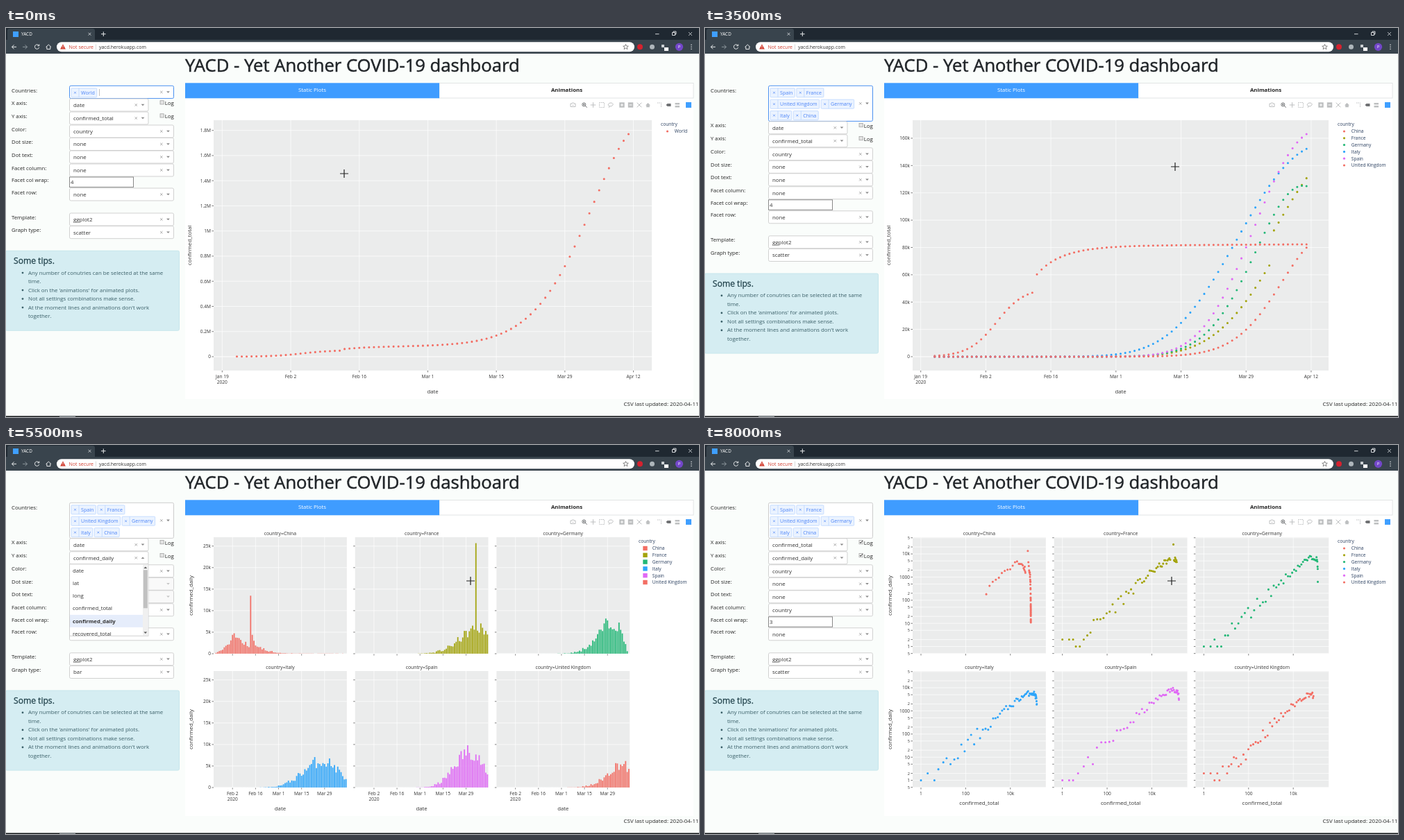
An HTML page for the animation above (8500 ms loop, 998 by 561 pixels).

```html
<!DOCTYPE html>
<html lang="en">
<head>
<meta charset="utf-8">
<title>YACD</title>
<style>
html, body { margin: 0; width: 100%; height: 100%; overflow: hidden; background: #fafdfb; }
svg { display: block; width: 998px; height: 561px; font-family: 'Open Sans', 'Noto Sans', sans-serif; }
text { white-space: pre; }
</style>
</head>
<body>
<svg id="stage" viewBox="0 0 998 561"></svg>
<script>
const STEP = 500, STEPS = 17;
const PALETTE = ['#f36e64', '#a3a30a', '#22b776', '#2ea5fa', '#e069f5'];
const ORDER = ['World', 'Spain', 'France', 'United Kingdom', 'Germany', 'Italy', 'China'];
const FIELDS = ['date', 'lat', 'long', 'confirmed_total', 'confirmed_daily', 'recovered_total',
  'recovered_daily', 'deaths_total', 'deaths_daily'];
const days = [...Array(81).keys()];

let seed = 11;
const rnd = () => (seed = seed * 16807 % 2147483647) / 2147483647;

// smooth growth: a cubic in log space through the values at four days
function growth(...values) {
  const knots = [39, 53, 67, 80];
  return d => Math.exp(knots.reduce((sum, a, i) =>
    sum + Math.log(values[i]) * knots.reduce((p, b, j) => i == j ? p : p * (d - b) / (a - b), 1), 0));
}

const china = d => 50000 / (1 + Math.exp((13.3 - d) / 3)) + 20 * d +
  (d < 22 ? 0 : 12500 + 18200 * (1 - Math.exp((22 - d) / 6)));
const france = growth(130, 4513, 40708, 110700);
const others = growth(8437, 86444, 637998, 1688500);
const CASES = {
  World: d => china(d) + others(d),
  Spain: growth(84, 7798, 80110, 163027),
  France: d => france(d) + (d < 73 ? 0 : 20000),
  'United Kingdom': growth(36, 1145, 19780, 79874),
  Germany: growth(130, 5795, 62095, 124908),
  Italy: growth(1694, 24747, 97689, 152271),
  China: china
};
const FATAL = { Germany: .022, China: .04, Spain: .102, France: .106, 'United Kingdom': .124, Italy: .128 };

const data = {};
for (const name of ORDER) {
  const sum = days.map(d => Math.round(CASES[name](d)));
  const daily = sum.map((v, d) => {
    const diff = d ? v - sum[d - 1] : 0;
    if (diff > 9000) return diff;
    const noise = .45 + 1.2 / (1 + diff / 300);
    return Math.max(0, Math.round(diff * Math.exp(noise * (rnd() - .5))));
  });
  const deaths = sum.map((v, d) => FATAL[name] * v * (d / 80) ** 2);
  data[name] = { date: days, confirmed_total: sum, confirmed_daily: daily, deaths_total: deaths };
}

const text = (x, y, s, size = 7.85, fill = '#333', anchor = 'start', extra = '') =>
  `<text x="${x}" y="${y + size * .36}" font-size="${size}" fill="${fill}" text-anchor="${anchor}" ${extra}>${s}</text>`;
const rect = (x, y, w, h, fill, extra = '') =>
  `<rect x="${x}" y="${y}" width="${w}" height="${h}" fill="${fill}" ${extra}/>`;
const line = (d, stroke, w = 1, extra = '') =>
  `<path d="${d}" fill="none" stroke="${stroke}" stroke-width="${w}" ${extra}/>`;
const shape = (d, fill) => `<path d="${d}" fill="${fill}"/>`;
const disc = (x, y, r, fill) => `<circle cx="${x}" cy="${y}" r="${r}" fill="${fill}"/>`;
const cross = (x, y, r, c, w = .8) => line(`M${x - r} ${y - r}l${2 * r} ${2 * r}m0 ${-2 * r}l${-2 * r} ${2 * r}`, c, w);
const plus = (x, y, r, c, w = 1) => line(`M${x - r} ${y}h${2 * r}m${-r} ${-r}v${2 * r}`, c, w);
const arrow = (x, y, up, c = '#888') => shape(`M${x - 2.4} ${y + (up ? 1.3 : -1.3)}h4.8l-2.4 ${up ? -2.6 : 2.6}z`, c);
const bold = 'font-weight="700"';
const heavy = (c, w) => `stroke="${c}" stroke-width="${w}"`;

const ruler = document.createElement('canvas').getContext('2d');
ruler.font = "7.1px 'Open Sans', 'Noto Sans', sans-serif";
const chipWidth = n => 17 + ruler.measureText(n).width;

function browser(hover) {
  const w = '#e8eaec';
  return rect(0, 0, 998, 18, '#1f2831') + rect(0, 17, 998, 20, '#39444d') +
    shape('M2 18V4q0-3 3-3H125q3 0 3 3V18z', '#39444d') +
    rect(10, 5, 8, 8, '#3f9fff') + text(22, 8.5, 'YACD', 6.4, '#fff') +
    cross(120.5, 8.7, 1.9, w) + plus(140.3, 8.7, 3.3, w) +
    line('M935 8.7h5.5M959.5 6.5h4v4h-4zM961 6.5V5h4v4h-1.5', w, .9) + cross(985.5, 8.5, 2.4, w) +
    line('M15 27.3H8.5m3-3l-3 3 3 3', w) + line('M24 27.3h6.5m-3-3l3 3-3 3', '#8d969d') +
    line('M47.3 25.3a3.2 3.2 0 1 0 .4 2.8M47.8 23.5v2.3h-2.3M57.5 27.5l3.8-3.5 3.8 3.5M58.8 27v3.5h5V27', w) +
    rect(73, 20.3, 832, 14, hover ? '#eceff1' : '#fff', 'rx="7"') +
    shape('M82 23.2l3.9 7.2h-7.8z', '#d23f31') + line('M82 25.5v2.2m0 .8v.8', '#fff', .8) +
    text(90.5, 27.3, 'Not secure', 7.05, '#d23f31') + line('M129.5 23.5V31', '#ccc', .7) +
    text(134, 27.3, 'yacd.herokuapp.com', 6.95) +
    line('M892.5 23.5l1.1 2.5 2.7.2-2.1 1.7.7 2.7-2.4-1.5-2.4 1.5.7-2.7-2.1-1.7 2.7-.2z', '#555', .7) +
    disc(913, 27.3, 4, '#d5222f') + disc(930.5, 27.3, 3.5, '#aeb6bb') +
    rect(944, 24, 4, 4, '#c9ced1') + rect(948, 28, 6, 5, '#fff') +
    disc(969.5, 27.3, 5.6, '#7347c9') + text(969.5, 27.3, 'P', 6, '#fff', 'middle') +
    [24.3, 27.3, 30.3].map(y => disc(987, y, .8, w)).join('');
}

function modebar(short) {
  const light = '#bdbfc0', dark = '#6f7173', s = short ? 25 : 0;
  const icon = (x, d, c = light) => line(d, c, 1, `transform="translate(${x} 111)"`);
  const tile = x => rect(x - 3.7, 107.3, 7.4, 7.4, light);
  return icon(816.5 + s, 'M-3.5-2h2l.5-1h2l.5 1h2v4.5h-7zM-1 .3h2') +
    icon(833 + s, 'M1.8-.6a2.5 2.5 0 1 0-5 0 2.5 2.5 0 1 0 5 0M1.2 1.2l2.5 2.5M-2-.6h2.6M-.7-1.9v2.6', dark) +
    plus(845.5 + s, 111, 3.8, light) +
    (short ? '' : rect(854.5, 107.5, 7, 7, 'none', `stroke="${light}" stroke-dasharray="1.5 1"`) +
      icon(870.5, 'M-2 1.5c-3-2 0-4.5 2.5-4.5s4.5 2 2 4-4 0-4.5.5 1 1.5-.5 2.5')) +
    tile(887) + plus(887, 111, 2, '#fff') + tile(899.5) + line('M897.5 111h4', '#fff') +
    cross(912, 111, 3.3, light, 1) + shape('M921 111.5l3.5-3.5 3.5 3.5h-1.2v2.7h-4.6v-2.7z', light) +
    line('M938 108h5.500v6', light, 1, 'stroke-dasharray="1.5 1"') + shape('M950.5 111l2-2h5v4h-5z', dark) +
    rect(963.5, 108, 6.5, 2.5, light) + rect(963.5, 112, 6.5, 2.5, light) + rect(979, 107, 8, 8, '#3f9fff');
}

function select(y, value, { right = 241.5, off = false, open = false } = {}) {
  const a = right - 8;
  return rect(91.5, y - 9, right - 91.5, 18, off ? '#f9f9f9' : '#fff', 'rx="2" stroke="#ccc" stroke-width=".9"') +
    text(97, y, value) + (off ? '' : cross(a - 9.7, y, 1.7, '#999')) + arrow(a, y, open, off ? '#c4c4c4' : '#888');
}

function menu(y, h, right, items, chosen) {
  return rect(91.5, y, right - 91.5, h, '#fff', 'stroke="#ccc" stroke-width=".9"') +
    items.map((s, i) => {
      const on = s == chosen, top = y + .3 + i * 18.2;
      return (on ? rect(92, top, right - 92.5, 18, '#e6edfb') : '') +
        text(96, top + 9, s, 7.75, '#333', 'start', on ? bold : '');
    }).join('');
}

function chips(names, focus, caret) {
  const blue = '#4a83f7', pale = '#bcd6ff';
  let x = 94, row = 0, s = '';
  for (const n of names) {
    const w = chipWidth(n);
    if (x + w > 218) { x = 94; row++; }
    const y = 86.8 + row * 16.4;
    s += rect(x, y, w, 13, '#ebf3ff', `rx="1" stroke="${pale}" stroke-width=".8"`) +
      line(`M${x + 11} ${y}v13`, pale, .8) + cross(x + 5.5, y + 6.5, 1.4, blue, .7) + text(x + 14, y + 6.6, n, 7.1, blue);
    x += w + 2.5;
  }
  if (x > 215) row++;
  const h = 18.3 + row * 16.4, mid = 83.3 + h / 2;
  const box = rect(91.5, 83.3, 150, h, '#fff', `rx="2" stroke="${focus ? '#4a90f0' : '#ccc'}"`) +
    cross(223.8, mid, 1.7, '#999') + arrow(233.5, mid);
  return { svg: box + s + (caret ? line('M134.5 88v10', '#999', .6) : ''), shift: row * 16.4 };
}

const TIPS = ['*Any number of conutries can be selected at the same', 'time.', "*Click on the 'animations' for animated plots.",
  '*Not all settings combinations make sense.', "*At the moment lines and animations don't work", 'together.'];

function tips(t) {
  const ink = '#3a5f68', dark = '#24454e';
  return rect(-.5, t, 250, 115, '#d5edf2', 'rx="2" stroke="#c6e6ec"') +
    text(11, t + 14.7, 'Some tips.', 12.1, dark, 'start', heavy(dark, .3)) +
    TIPS.map((r, i) => {
      const y = t + 31.5 + i * 12.5;
      return (r[0] == '*' ? disc(24, y + .3, 1.4, ink) : '') + text(32, y, r.replace('*', ''), 7.85, ink);
    }).join('');
}

function logBox(y, on) {
  return rect(222, y - 3.2, 5.2, 5.2, on ? '#fff' : '#e4e4e4', 'stroke="#999" stroke-width=".7"') +
    text(228.7, y, 'Log', 7.85, '#222') + (on ? line(`M223 ${y - .8}l1.3 1.5 2.4-3.3`, '#222') : '');
}

function form(v) {
  const c = chips(v.names, v.step < 8, v.step == 0), o = c.shift;
  const wrap = y => rect(91.5, y - 7.5, 92, 14.5, '#fff', 'stroke="#888"') + text(93, y, v.facet ? '3' : '4', 7.75);
  const rows = [
    ['X axis:', 111, y => select(y, v.x, { right: 205 }) + logBox(y - 3, v.log)],
    ['Y axis:', 130, y => select(y, v.y, { right: 205, open: v.menu == 'y' }) + logBox(y - 3, v.log)],
    ['Color:', 149, y => select(y, 'country')],
    ['Dot size:', 167.5, y => select(y, 'none', { off: v.kind != 'scatter' })],
    ['Dot text:', 186, y => select(y, 'none', { off: v.kind == 'bar' })],
    ['Facet column:', 205, y => select(y, v.facet ? 'country' : 'none')],
    ['Facet col wrap:', 222.5, wrap],
    ['Facet row:', 240, y => select(y, 'none')],
    ['Template:', 276, y => select(y, 'ggplot2')],
    ['Graph type:', 294.7, y => select(y, v.kind, { open: v.menu == 'kind' })]
  ];
  let s = c.svg + text(8, 90, 'Countries:', 7.75, '#222') + tips(321.3 + o);
  for (const [label, y, draw] of rows) s += text(8, y + o - 3.2, label, 7.75, '#222') + draw(y + o);
  if (v.menu == 'kind') s += menu(303.7 + o, 54.5, 241.5, ['scatter', 'bar', 'line'], v.kind);
  if (v.menu == 'y') {
    const from = v.y == 'deaths_total' ? 3 : 0;
    s += menu(139 + o, 103.5, 205, FIELDS.slice(from, from + 6), v.y) + rect(197, 139.5 + o, 7.5, 102.5, '#f0f0f0') +
      rect(197.8, (from ? 168 : 147.5) + o, 6, 55, '#c1c1c1') +
      arrow(200.8, 144 + o, true, '#555') + arrow(200.8, 238 + o, false, '#555');
  }
  return s;
}

const range = (from, to, step) => {
  const r = [];
  for (let v = from; v <= to + 1e-9; v += step) r.push(v);
  return r;
};
const short = (n, mega) => n && mega ? +(n / 1e6).toFixed(1) + 'M' : n > 1000 ? n / 1000 + 'k' : String(n);
const dayName = d => new Date(Date.UTC(2020, 0, 22 + d)).toLocaleDateString('en-US', { month: 'short', day: 'numeric', timeZone: 'UTC' });
const lg = Math.log10;

function chart(v) {
  const { kind, facet, log } = v;
  const byDate = v.x == 'date';
  const names = [...v.names].sort();
  const right = v.step < 2 ? 930 : v.step == 2 ? 927.4 : 898;
  const color = n => PALETTE[names.indexOf(n) % 5];
  const stacked = kind == 'bar' && !facet;
  const top = f => Math.max(...names.map(n => Math.max(...data[n][f])));
  const yMax = stacked ? names.reduce((a, n) => a + data[n][v.y][80], 0) : top(v.y);
  const xMax = top('confirmed_total');
  const boxes = facet ? names.map((n, i) => {
    const l = 299 + (i % 3) * 203.7, t = i < 3 ? 133 : 326;
    return { l, w: 191.8, t, h: 168, names: [n], low: i > 2, first: i % 3 == 0 };
  }) : [{ l: 299, w: right - 299, t: 133, h: 361, names, low: true, first: true }];
  const yStep = yMax > 1e6 ? 2e5 : yMax > 3e5 ? 1e5 : yMax > 5e4 ? 2e4 : 5e3;
  const [from, to] = { scatter: [-4.75, 84.75], line: [0, 80], bar: [-.5, 80.5] }[kind];
  let s = rect(258, 102, 732, 433, '#fff') + modebar(kind == 'line');

  for (const { l, w, t, h, names: shown, low, first } of boxes) {
    const b = t + h, mid = l + w / 2;
    const pad = kind == 'bar' ? 0 : kind == 'line' ? h * .05 : facet ? 10.4 : 20;
    const tall = kind == 'bar' ? h * .95 : h - 2 * pad;
    const part = (n, max) => log ? lg(n) / lg(max) : n / max;
    const Y = n => b - pad - tall * part(n, yMax);
    const X = n => byDate ? l + w * (n - from) / (to - from) : l + 12 + (w - 24) * part(n, xMax);
    const xt = byDate ? range(-3, 81, 14).filter(d => d >= from && d <= to) : log ? [1, 100, 1e4] : range(0, 15e4, 5e4);
    const yt = log ? range(-1, 4, 1).flatMap(e => [1, 2, 5].map(m => m * 10 ** e)).filter(n => n >= .5)
      : range(0, yMax * 1.1, yStep).filter(n => Y(n) >= t);

    s += rect(l, t, w, h, '#ebecec');
    for (const n of xt) {
      s += line(`M${X(n)} ${t}v${h}`, '#fff', .7) + line(`M${X(n)} ${b}v2.5`, '#444', .7);
      if (low) s += text(X(n), 503, byDate ? dayName(n) : short(n), 6.6, '#333', 'middle');
    }
    for (const n of yt) {
      s += line(`M${l} ${Y(n)}h${w}`, '#fff', n ? .7 : 1) + line(`M${l - 2.5} ${Y(n)}h2.5`, '#444', .7);
      const lead = log ? +n.toExponential()[0] : 1;
      if (first) s += text(l - 4, Y(n), lead > 1 ? lead : short(n, yMax > 1e6), lead > 1 ? 5.6 : 6.6, '#333', 'end');
    }
    if (low && byDate) s += text(X(xt[0]), 510.7, '2020', 6.6, '#333', 'middle');
    if (low) s += text(mid, byDate ? 524 : 516, v.x, 7.8, '#333', 'middle');
    if (first) {
      const cy = t + h / 2, cx = facet ? 266 : 264;
      s += text(cx, cy, v.y, 7.8, '#333', 'middle', `transform="rotate(-90 ${cx} ${cy})"`);
    }
    if (facet) s += text(mid, t - 5, 'country=' + shown[0], 6.8, '#333', 'middle');

    const base = days.map(() => 0), bw = .8 * w / 81;
    for (const n of shown) {
      const xs = data[n][v.x], ys = data[n][v.y];
      const marks = days.filter(d => kind == 'bar' ? ys[d] > 0 : !log || xs[d] > 0 && ys[d] > 0).map(d => {
        const x = X(xs[d]), y = Y(base[d] + ys[d]);
        if (kind == 'line') return (d ? 'L' : 'M') + x + ' ' + y;
        if (kind == 'scatter') return `M${x} ${y}h.01`;
        const bar = `M${x - bw / 2} ${Y(base[d])}h${bw}V${y}h${-bw}z`;
        base[d] += ys[d];
        return bar;
      }).join('');
      s += kind == 'bar' ? `<path d="${marks}" fill="${color(n)}" stroke="#ebecec" stroke-width="${facet ? .15 : .4}"/>`
        : line(marks, color(n), kind == 'line' ? 1.1 : 3.1, 'stroke-linecap="round"');
    }
  }
  return s + legend(names, right + 13, kind, color);
}

function legend(names, left, kind, color) {
  const ink = '#2a3f5f', x = left + 9.5;
  const key = {
    bar: (y, c) => rect(x - 3.2, y - 3.2, 6.4, 6.4, c),
    line: (y, c) => line(`M${x - 7.5} ${y}h15`, c, 1.1),
    scatter: (y, c) => disc(x, y, 1.6, c)
  }[kind];
  return text(left, 139, 'country', 6.7, ink) +
    names.map((n, i) => key(149 + i * 9.8, color(n)) + text(left + 19.8, 149 + i * 9.8, n, 6.62, ink)).join('');
}

function pointer(k) {
  const keys = [[0, 487, 210], [3, 655, 199], [7, 677, 200], [9, 677, 196], [11, 669, 196], [16, 672, 196]];
  const i = Math.max(1, keys.findIndex(p => p[0] >= k)), a = keys[i - 1], b = keys[i];
  const u = (k - a[0]) / (b[0] - a[0]), mix = j => a[j] + (b[j] - a[j]) * u;
  return plus(mix(1), mix(2), 6, '#222', 1.2);
}

function view(k) {
  return {
    step: k,
    names: k < 7 ? ORDER.slice(0, k + 1) : ORDER.slice(1),
    kind: k == 8 ? 'line' : k > 8 && k < 14 ? 'bar' : 'scatter',
    facet: k >= 10,
    x: k >= 14 ? 'confirmed_total' : 'date',
    y: k == 11 || k > 14 ? 'confirmed_daily' : k == 12 ? 'deaths_total' : 'confirmed_total',
    log: k == 16,
    menu: k == 8 || k == 9 ? 'kind' : k == 11 || k == 12 || k == 15 ? 'y' : ''
  };
}

function render(k) {
  const v = view(k), ink = '#212529';
  return rect(0, 0, 998, 561, '#fafdfb') + browser(k == 5) +
    text(258, 53.5, 'YACD - Yet Another COVID-19 dashboard', 25.65, ink, 'start', heavy(ink, .5)) +
    rect(624, 79.5, 366, 21.5, '#fff', 'stroke="#dcdfe0" stroke-width=".8"') + rect(258, 79.3, 366, 22, '#3f9cff') +
    text(441, 89.3, 'Static Plots', 7.85, '#fff', 'middle') + text(807.5, 89.3, 'Animations', 7.85, '#222', 'middle', bold) +
    chart(v) + form(v) + text(997.5, 542.3, 'CSV last updated: 2020-04-11', 7.95, '#222', 'end') +
    rect(0, 559.5, 998, 1.5, '#15181a') + rect(77, 559.5, 23, 1.5, '#8a9094') + pointer(k);
}

const stage = document.getElementById('stage');
const start = performance.now();
let shown = -1;
function tick() {
  const k = Math.floor((performance.now() - start) / STEP) % STEPS;
  if (k != shown) stage.innerHTML = render(shown = k);
  requestAnimationFrame(tick);
}
tick();
</script>
</body>
</html>
```
